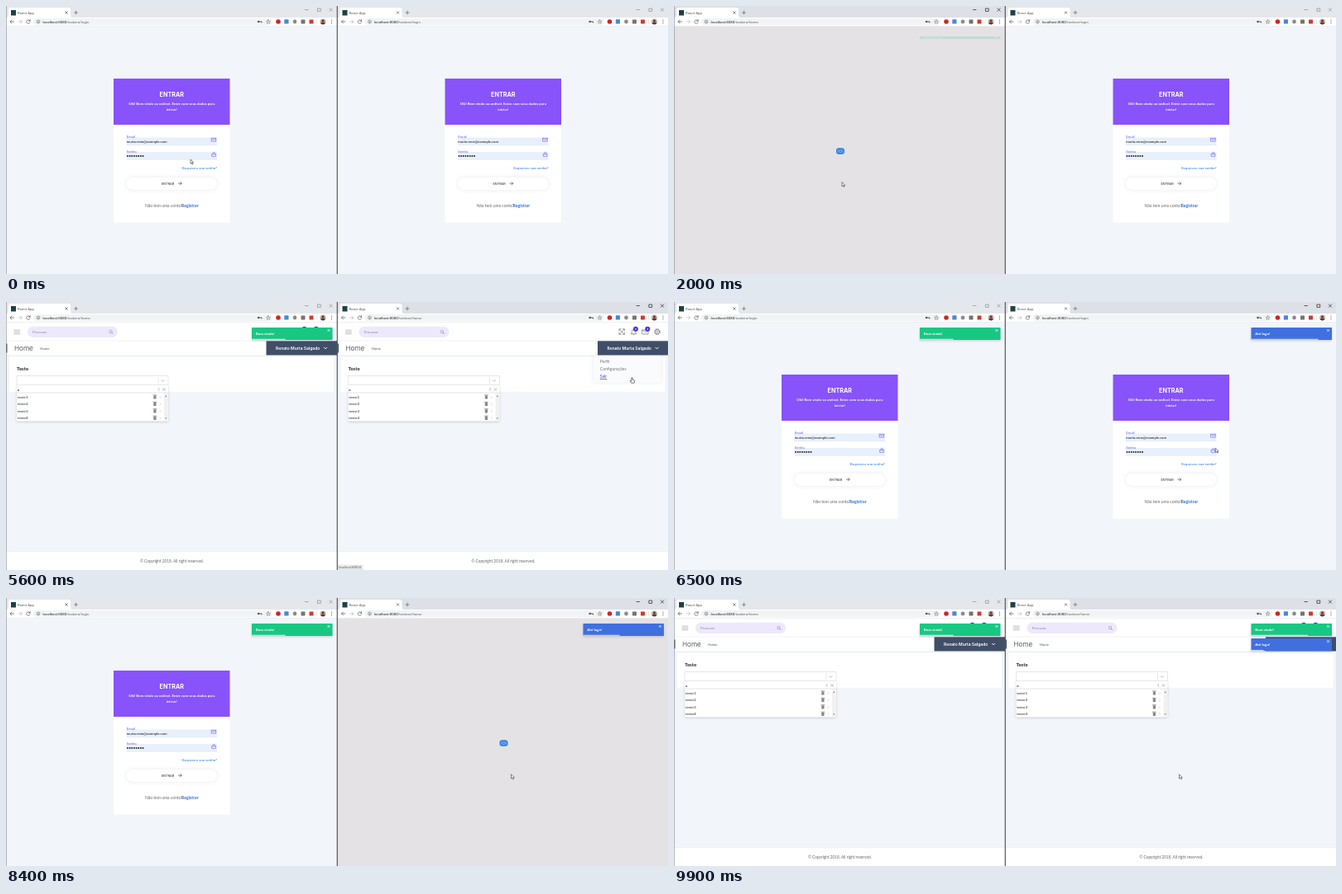
Recreate the animation shown at these times as an HTML page. Size 800 by 325 pixels, loop 10 s.

```html
<!DOCTYPE html>
<html lang="pt">
<head>
<meta charset="utf-8">
<title>Login em duas janelas</title>
<style>
html, body { margin: 0; width: 100%; height: 100%; overflow: hidden; background: #f2f6fa; }
svg { display: block; width: 800px; height: 325px; font-family: Lato, sans-serif; }
.ui { font-family: Roboto, sans-serif; }
.head { font-family: Inter, sans-serif; }
.line { fill: none; stroke-width: .7; stroke-linecap: round; stroke-linejoin: round; }
.mid { text-anchor: middle; }
.end { text-anchor: end; }
.shadow { filter: drop-shadow(0 1px 1.5px rgba(40, 50, 90, .22)); }
.glow { filter: drop-shadow(0 0 2.5px rgba(90, 80, 140, .14)); }
.controls { opacity: .45; }
.focused .controls { opacity: 1; }
.frame { fill: #e4e7eb; }
.focused .frame { fill: #dde0e6; }
.button rect { fill: #fff; }
.button text { fill: #444; }
.button path { stroke: #555; }
.button.hover rect { fill: #2672dc; }
.button.hover text { fill: #fff; }
.button.hover path { stroke: #fff; }
</style>
</head>
<body>
<svg id="stage" viewBox="0 0 800 325"></svg>
<script>
const LOOP = 10000, STEP = 100, SHIFT = 400.5;
const TOAST_LIFE = 5000, TOAST_W = 97.5, TOAST_H = 15;

const rect = (x, y, w, h, fill, more = '') =>
  `<rect x="${x}" y="${y}" width="${w}" height="${h}" fill="${fill}" ${more}/>`;
const circle = (x, y, r, fill, more = '') =>
  `<circle cx="${x}" cy="${y}" r="${r}" fill="${fill}" ${more}/>`;
const text = (x, y, size, fill, str, more = '') =>
  `<text x="${x}" y="${y}" font-size="${size}" fill="${fill}" ${more}>${str}</text>`;
const line = (d, color, more = '') =>
  `<path class="line" d="${d}" stroke="${color}" ${more}/>`;
const cross = (x, y, r, color) =>
  line(`M${x - r} ${y - r}l${2 * r} ${2 * r}m0 ${-2 * r}l${-2 * r} ${2 * r}`, color);
const part = (name, body, more = '') => `<g data-part="${name}" ${more}>${body}</g>`;
const repeat = (n, fn) => Array.from({ length: n }, (_, i) => fn(i)).join('');

function chrome() {
  return rect(0, 0, 400, 14.5, '#e4e7eb', 'class="frame"')
    + '<path d="M1 14.5Q3 14 3 11V4Q3 2 5 2H76Q78 2 78 4V11Q78 14 80 14.5Z" fill="#fff"/>'
    + rect(6, 5, 6, 6.5, '#1d4148')
    + text(14, 9.8, 4.4, '#555', 'React App', 'class="ui"')
    + cross(73, 8, 1.2, '#555')
    + line('M82.5 8h4m-2-2v4', '#666')
    + `<g class="controls">${line('M361.5 4.5h3.5M376.8 3h3.4v3.4h-3.4z', '#222')}${cross(392.5, 4.6, 1.7, '#222')}</g>`
    + rect(0, 14, 400, 10.5, '#fff')
    + line('M9.5 19h-4.5m2-2l-2 2 2 2', '#555')
    + line('M15 19h4.5m-2-2l2 2-2 2', '#bbb')
    + line('M28.8 17.8a2.2 2.2 0 1 0 .3 2M29.2 16.6v1.6h-1.6', '#555')
    + rect(33, 15, 289, 8.2, '#f1f3f4', 'rx="4.1"')
    + circle(39, 19, 1.9, 'none', 'stroke="#666" stroke-width=".6"')
    + line('M39 18.8v1.2', '#666')
    + `<text x="44.5" y="20.7" font-size="4.35" fill="#222" class="ui">localhost:8080<tspan fill="#666" data-part="path"></tspan></text>`
    + circle(305, 19, 1.2, '#555') + line('M306 19h3v1', '#555', 'style="stroke-width:1"')
    + line('M317 16.7l.7 1.6 1.8.1-1.4 1.1.5 1.8-1.6-1-1.6 1 .5-1.8-1.4-1.1 1.8-.1z', '#666', 'style="stroke-width:.5"')
    + circle(329, 19, 2.8, '#cc2526')
    + rect(336.3, 16.3, 5.2, 5.2, '#4c86d9', 'rx=".6"')
    + circle(349, 19, 2.4, '#8a8a8a')
    + rect(356.5, 16.4, 5, 5, '#77736e', 'rx=".6"')
    + rect(366.5, 16.4, 5, 5, '#cf3a33', 'rx=".6"')
    + line('M376 16.5v5', '#ddd')
    + circle(383, 19, 3.5, '#c9a99a')
    + '<path d="M380.2 21.1q.4-1.6 2.8-1.6t2.8 1.6a3.5 3.5 0 0 1-5.6 0z" fill="#5a3a35"/>'
    + circle(383, 18, 1.5, '#5a3a35')
    + repeat(3, i => circle(393.5, 17 + 2 * i, .6, '#555'))
    + line('M0 24.5H400', '#dfe2e6', 'style="stroke-width:.5"');
}

function login() {
  const violet = '#6a59ee', blue = '#2f72e4';
  const field = (y, label) => rect(145.5, y, 109.5, 9.3, '#e8f0fc')
    + line(`M145.5 ${y + 9.3}h109.5`, '#d5dbea', 'style="stroke-width:.4"')
    + text(145.8, y + .6, 4.4, violet, label);
  return rect(0, 24.5, 400, 301, '#f2f6fa')
    + rect(130, 88, 140.5, 174.5, '#fff')
    + rect(130, 88, 140.5, 56, '#8853fb')
    + text(200.3, 110.4, 7.2, '#fff', 'ENTRAR', 'class="head mid" font-weight="700"')
    + text(200.3, 119.8, 4.4, '#fff', 'Olá! Bem vindo ao ordivel. Entre com seus dados para', 'class="mid" font-weight="700"')
    + text(200.3, 126.6, 4.4, '#fff', 'iniciar!', 'class="mid" font-weight="700"')
    + field(159.5, 'Email')
    + text(145.8, 165.6, 4.3, '#111', 'murta.rena@example.com')
    + line('M248.5 160.3h5.2v3.8h-5.2zl2.6 2.2 2.6-2.2', violet, 'style="stroke-width:.6"')
    + field(177, 'Senha')
    + repeat(8, i => circle(147 + 2.65 * i, 181.9, .95, '#111'))
    + line('M249 179.5h4.4v2.8h-4.4zm1 0v-1a1.2 1.2 0 0 1 2.4 0v1', violet, 'style="stroke-width:.6"')
    + text(255, 198.4, 4.6, blue, 'Esqueceu sua senha?', 'class="end"')
    + part('button', rect(145.5, 208, 109.5, 15, '', 'rx="7.5" class="glow"')
      + text(188, 216.8, 3.8, '', 'ENTRAR', 'class="head" font-weight="500"')
      + line('M208.3 215.2h3.8m-1.6-1.7l1.7 1.7-1.7 1.7', ''), 'class="button"')
    + text(168, 244.3, 5, '#666', 'Não tem uma conta?')
    + text(212, 244.3, 5.2, blue, 'Registrar', 'font-weight="700"');
}

function home() {
  const gray = '#777';
  const badge = x => circle(x, 32.8, 3, '#4a2fe0') + rect(x - .4, 31.6, .8, 2.4, '#fff');
  const item = i => {
    const y = 117 + 8.45 * i;
    return text(13.8, y, 4.6, '#222', `teste${i + 1}`)
      + rect(178.3, y - 3.6, 3.2, 4.2, '#888', 'rx=".5"')
      + line(`M177.9 ${y - 4.2}h4`, '#777')
      + line(`M186 ${y - 2.8}l1 1.3-1 1.3`, '#bbb', 'style="stroke-width:.5"');
  };
  return rect(0, 24.5, 400, 301, '#f2f6fa')
    + rect(0, 24.5, 400, 40.5, '#fff')
    + line('M9.8 34.2h7M9.8 36.4h7M9.8 38.6h7', gray, 'style="stroke-width:.5"')
    + rect(26, 29.7, 109, 13.3, '#eee8fc', 'rx="6.6"')
    + text(32, 38, 4.6, '#8d88a6', 'Procurar')
    + circle(126.5, 36, 1.7, 'none', 'stroke="#8d88a6" stroke-width=".6"')
    + line('M127.8 37.3l1.4 1.4', '#8d88a6')
    + line('M340.5 35v-2.2h2.2m2 0h2.2v2.2m0 2v2.2h-2.2m-2 0h-2.2v-2.2m.2-4l6.1 6.1m0-6.1l-6.1 6.1', gray)
    + line('M354.8 38.4q1.2-1 1.2-3 .1-2.2 2-2.2t2 2.2q0 2 1.2 3zm2.4 1q.8 1 1.6 0', gray)
    + badge(360.5)
    + line('M368.5 34h7v5h-7zl3.5 2.6 3.5-2.6', gray) + badge(374.8)
    + circle(386.5, 36, 3.2, 'none', `stroke="${gray}" stroke-width="1.1" stroke-dasharray="1.7 .8"`)
    + circle(386.5, 36, 2.7, 'none', `stroke="${gray}" stroke-width=".5"`)
    + circle(386.5, 36, 1.2, 'none', `stroke="${gray}" stroke-width=".6"`)
    + line('M0 47H400', '#e8eaf0', 'style="stroke-width:.6"')
    + rect(0, 50.5, 1.4, 11, '#333b4a')
    + text(10, 59.4, 8.2, '#333', 'Home', 'class="head" font-weight="300"')
    + text(41.3, 58, 4.2, '#555', 'Home')
    + rect(314.5, 47.3, 85.5, 17.4, '#414e68')
    + text(326, 57.7, 5, '#fff', 'Renato Murta Salgado', 'class="head" font-weight="600"')
    + line('M384.5 55.2l1.6 1.6 1.6-1.6', '#fff', 'style="stroke-width:1"')
    + line('M0 65H400', '#e6eaf0', 'style="stroke-width:.7"')
    + rect(4, 66.5, 392, 42.3, '#fff')
    + text(13, 83, 6, '#222', 'Teste', 'font-weight="700"')
    + rect(13, 89.7, 183, 11.2, '#fff', 'stroke="#d5d7dc" stroke-width=".6"')
    + line('M184 91.5v7.5', '#ddd') + line('M187.8 94.8l1.7 1.5 1.7-1.5', '#aaa')
    + `<g class="shadow">${rect(13, 101, 183, 43.5, '#fff')}</g>`
    + line('M13 110H196', '#d0d3d8', 'style="stroke-width:.6"')
    + text(13.8, 107.5, 4.6, '#111', 'a')
    + line('M185 104.2q-1.5 1.6 0 3.4', '#aaa') + cross(191, 106, 1.5, '#aaa')
    + repeat(4, item)
    + rect(191, 110.4, 4.6, 34, '#f1f1f1')
    + '<path d="M192 114.8l1.3-1.4 1.3 1.4zM192 140.4l1.3 1.4 1.3-1.4z" fill="#666"/>'
    + rect(0, 302.7, 400, 22.3, '#fff')
    + line('M0 302.7H400', '#e6eaf0', 'style="stroke-width:.6"')
    + text(200.3, 315.6, 4.75, '#666', '© Copyright 2018. All right reserved.', 'class="mid"');
}

function loading() {
  return rect(0, 24.5, 400, 301, '#e5e2e5')
    + rect(196, 172.3, 10, 7.4, '#2d7de0', 'rx="3.2"')
    + circle(201, 176, 1.6, 'none', 'stroke="#b9d6f8" stroke-width=".6"')
    + line('M198.3 174q-1.2 2 0 4M203.7 174q1.2 2 0 4', '#b9d6f8', 'style="stroke-width:.5"');
}

function menu() {
  return `<g class="glow">${rect(309.5, 65, 81.5, 32.5, '#f9fbfd')}</g>`
    + text(317.3, 73.6, 5.1, '#777', 'Perfil')
    + text(317.3, 83, 5.1, '#777', 'Configurações')
    + part('exit', text(317.3, 92, 5.1, 'currentColor', 'Sair'));
}

// Drawn around the origin so it can flip open about its middle.
function toast(name, color, label) {
  return part(name, rect(0, -TOAST_H / 2, TOAST_W, TOAST_H, color, 'rx=".4"')
    + text(4.8, 1.2, 4.5, '#fff', label, 'font-weight="700"')
    + cross(93, -4, 1.2, '#fff')
    + rect(0, TOAST_H / 2 - 1.2, TOAST_W, 1.2, 'rgba(255,255,255,.72)', 'data-bar'), 'class="shadow"');
}

const windowMarkup = i => `<g class="win" transform="translate(${i * SHIFT})">`
  + part('login', login()) + part('home', home()) + part('load', loading())
  + part('menu', menu())
  + part('status', rect(0, 318.7, 31, 7, '#e4e6e9') + text(1.5, 323.2, 3.6, '#666', 'localhost:8080/#', 'class="ui"'))
  + toast('hello', '#19c783', 'Bem vindo!') + toast('bye', '#406fdf', 'Até logo!')
  + chrome() + '</g>';

const stage = document.getElementById('stage');
stage.innerHTML = windowMarkup(0) + windowMarkup(1)
  + rect(0, 0, .6, 325, '#8b8d92') + rect(399.7, 0, 1.2, 325, '#55575c')
  + `<g id="cursor">
      <path id="arrow" d="M0 0V5.2L1.3 4.1 2.2 6 3 5.6 2.2 3.8H3.8Z" fill="#fff" stroke="#333" stroke-width=".6"/>
      <path id="hand" d="M-.7 0Q0-.8.7 0V2.2L2.8 2.9Q3.3 3.2 3.1 4L2.6 6.2H-.8L-2.3 3.8Q-2 3-1.3 3.5L-.7 4Z" fill="#fff" stroke="#222" stroke-width=".6"/>
    </g>`;

const wins = [...stage.querySelectorAll('.win')].map(root => {
  const parts = { root };
  root.querySelectorAll('[data-part]').forEach(el => parts[el.dataset.part] = el);
  return parts;
});
const [cursor, arrow, hand] = ['cursor', 'arrow', 'hand'].map(id => document.getElementById(id));

const pages = [
  [[0, 'login'], [1300, 'load'], [2100, 'home'], [6200, 'login'], [9100, 'home']],
  [[0, 'login'], [2400, 'home'], [5700, 'login'], [7900, 'load'], [8600, 'home']],
];
const focus = [[1250, 4850], [4850, LOOP]];
const hover = [[700, 1300], [6800, 7900]];
const handTimes = [...hover, [4400, 5700]];
const path = [
  [0, 223, 186], [300, 223, 186], [800, 203, 213.5], [3400, 203, 213.5],
  [4400, 757, 54], [4900, 757, 54], [5300, 756.5, 92], [5800, 756.5, 92],
  [6900, 610.5, 213.8], [LOOP, 610.5, 213.8],
];

const within = (t, [from, to]) => t >= from && t < to;
const show = (el, on) => { el.style.display = on ? '' : 'none'; };
const ease = p => p * p * (3 - 2 * p);

function cursorAt(t) {
  const i = path.findIndex(([end]) => t < end);
  const [t0, x0, y0] = path[i - 1], [t1, x1, y1] = path[i];
  const p = ease((t - t0) / (t1 - t0));
  return [x0 + (x1 - x0) * p, y0 + (y1 - y0) * p];
}

function drawToast(el, t, start, y, pause = LOOP) {
  show(el, t >= start);
  if (t < start) return;
  const open = Math.min(1, (t - start) / 350);
  const left = Math.max(0, 1 - (Math.min(t, pause) - start) / TOAST_LIFE);
  el.setAttribute('transform', `translate(297 ${y}) scale(1 ${open})`);
  el.style.opacity = open;
  el.querySelector('[data-bar]').setAttribute('width', TOAST_W * left);
}

function draw(t) {
  wins.forEach((w, i) => {
    const page = pages[i].filter(([from]) => t >= from).pop()[1];
    ['login', 'home', 'load'].forEach(name => show(w[name], name === page));
    w.path.textContent = page === 'login' ? '/taskera/login' : '/taskera/home';
    w.root.classList.toggle('focused', within(t, focus[i]));
    w.button.classList.toggle('hover', within(t, hover[i]));
    show(w.menu, i === 1 && within(t, [4800, 5700]));
    show(w.status, i === 1 && within(t, [5200, 5700]));
  });

  const [a, b] = wins;
  const onExit = within(t, [5200, 5700]);
  b.exit.style.color = onExit ? '#3b3ff0' : '#777';
  b.exit.style.textDecoration = onExit ? 'underline' : 'none';

  drawToast(a.hello, t, 1930, 38.4, focus[0][1]);
  show(a.bye, false);
  drawToast(b.hello, t, 8420, 38.4);
  drawToast(b.bye, t, 5660, t < 8420 ? 38.4 : 56.6);

  const [x, y] = cursorAt(t);
  const pointing = handTimes.some(span => within(t, span));
  cursor.setAttribute('transform', `translate(${x} ${y})`);
  show(hand, pointing);
  show(arrow, !pointing);
}

function tick() {
  draw(Math.floor(performance.now() % LOOP / STEP) * STEP);
  requestAnimationFrame(tick);
}
tick();
</script>
</body>
</html>
```
